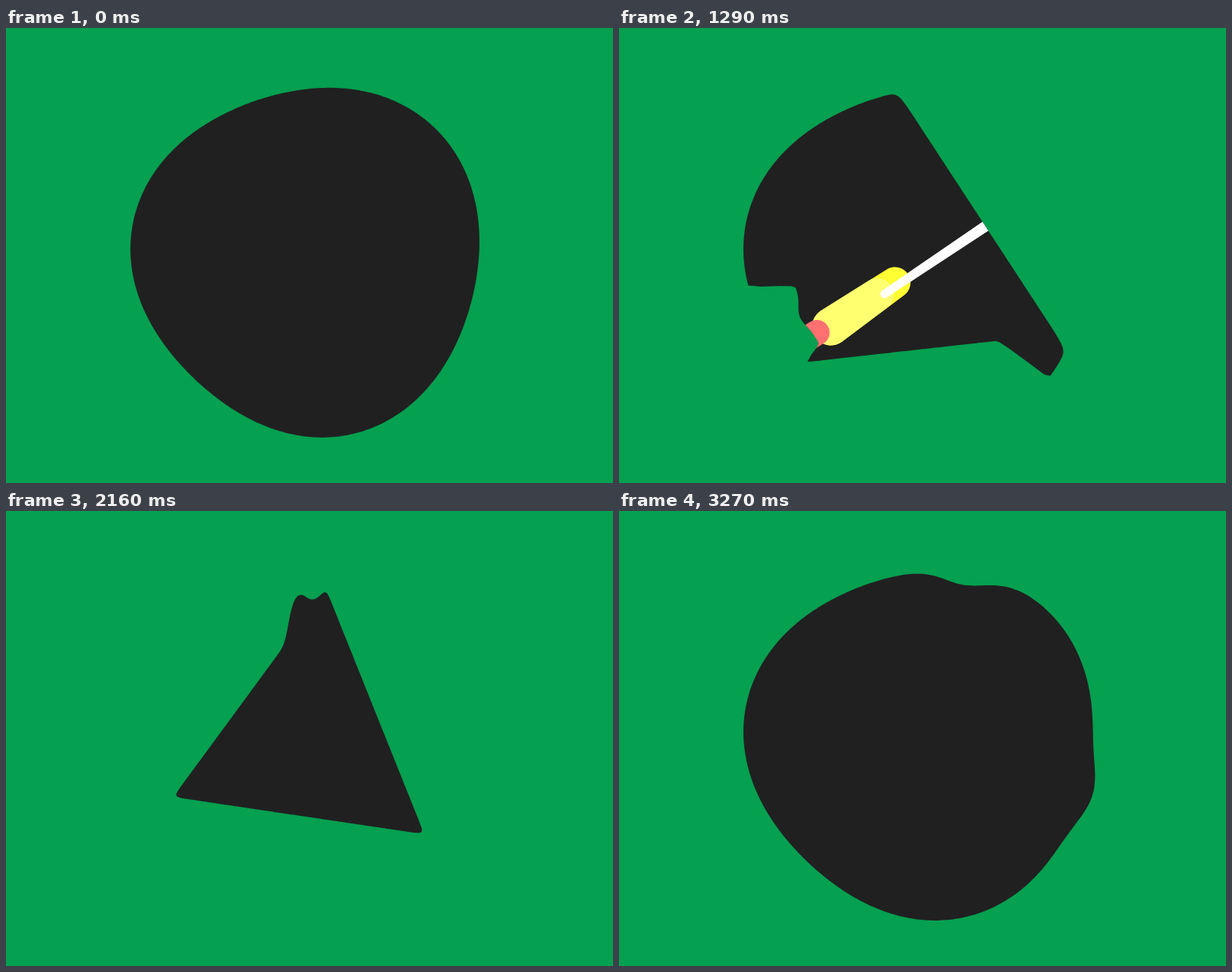
An HTML page with a canvas for the animation above (3.3 s loop, 800 by 600 pixels).

```html
<!DOCTYPE html>
<html lang="en">
<head>
<meta charset="utf-8">
<title>Cut blob</title>
<style>
html, body { margin: 0; width: 100%; height: 100%; overflow: hidden; background: #05a050; }
canvas { display: block; width: 800px; height: 600px; }
</style>
</head>
<body>
<canvas id="stage" width="800" height="600"></canvas>
<script>
const ctx = document.getElementById('stage').getContext('2d');
const LOOP = 3300, STEP = 30, RAD = Math.PI / 180;
const CX = 395, CY = 308;

const cosd = a => Math.cos(a * RAD);
const wrap = a => (a % 360 + 540) % 360 - 180;
const smooth = x => { x = Math.min(1, Math.max(0, x)); return x * x * (3 - 2 * x); };

// Mixes numbers, or whole nested lists and objects of them
function mix(a, b, k) {
  if (typeof a === 'number') return a + (b - a) * k;
  if (Array.isArray(a)) return a.map((v, i) => mix(v, b[i], k));
  return Object.fromEntries(Object.keys(a).map(n => [n, mix(a[n], b[n], k)]));
}
function pose(keys, t) {
  let i = 0;
  while (i < keys.length - 2 && t >= keys[i + 1][0]) i++;
  const [t0, a] = keys[i], [t1, b] = keys[i + 1];
  return mix(a, b, (t - t0) / (t1 - t0));
}

/* Blob: a wavy disc trimmed by three straight cuts.
   cuts: clockwise lines on the right, base and left
   reach: the angles over which each cut already bites
   bumps: angle, height, width; far: how far the cuts have moved outward */
const FULL = [[-130, 80], [0, 180], [120, 320]];
const blobKey = (cuts, bumps, more) =>
  ({ cuts, bumps, reach: FULL, spin: 0, far: 1, tall: 1, ...more });

const firstCuts = [[437,94, 500,290], [412,466, 271,431], [275,440, 200,265]];
const uncut = [[-80, -80], [80, 80], [150, 150]];
const disc = blobKey(firstCuts, [[149, 0, 9], [40, 0, 6]], { reach: uncut });
const rightCut = blobKey(firstCuts, [[149, 0, 9], [40, 24, 6]],
  { reach: [[-130, 33], uncut[1], uncut[2]] });
const baseCut = blobKey([[420,96, 560,446], firstCuts[1], firstCuts[2]],
  [[149, -50, 9], [67, 12, 8]], { reach: [FULL[0], [77, 158], uncut[2]] });
const leftCut = blobKey([[318,87, 580,335], [572,355, 285,444], firstCuts[2]],
  [[152, 33, 4], [248, 28, 8]], { reach: [FULL[0], FULL[1], [120, 199]] });
const topCut = blobKey([[414,85, 550,408], [538,420, 238,385], [234,364, 349,193]],
  [[152, 0, 4], [262, 28, 10]], { reach: [FULL[0], FULL[1], [120, 256]] });
const triangle = blobKey([[447,108, 531,428], [518,440, 228,359], [228,339, 410,146]],
  [[376, 0, 12], [281, 22, 4]]);
const regrown = { ...triangle, spin: 60, far: 2.8, bumps: [[376, 14, 12], [286, -17, 11]] };
const flatBumps = [[376, 0, 12], [286, 0, 11]];

const blobKeys = [
  [0, disc],
  [570, rightCut],
  [1050, baseCut],
  [1560, leftCut],
  [1830, topCut],
  [2190, { ...triangle, spin: -7, bumps: [[376, 0, 12], [274, 40, 5]] }],
  [2550, triangle],
  [2700, { ...triangle, spin: 30, bumps: flatBumps }],
  [3000, { ...regrown, tall: 1.09, bumps: flatBumps }],
  [3270, regrown],
  [3300, { ...regrown, bumps: flatBumps }]
];

function radius(a, s) {
  const SHARP = 30, SOFT = 10;
  const base = 229 - 9 * cosd(3 * (a - 13)) - 7 * cosd(a - 145);
  let sum = base ** -SHARP;
  s.cuts.forEach(([x0, y0, x1, y1], i) => {
    const dx = x1 - x0, dy = y1 - y0, len = Math.hypot(dx, dy);
    const dist = ((x0 - CX) * dy - (y0 - CY) * dx) / len * s.far;
    const normal = Math.atan2(-dx, dy) / RAD + s.spin;
    const [from, to] = s.reach[i];
    const inside = (to - from) / 2 - Math.abs(wrap(a - s.spin - (from + to) / 2));
    const bite = smooth(inside / SOFT + .5) * Math.max(0, cosd(a - normal)) / dist;
    sum += bite ** SHARP;
  });
  const r = sum ** (-1 / SHARP);
  return s.bumps.reduce((v, [at, h, w]) =>
    v + h * Math.exp(-((wrap(a - s.spin * (s.far < 1.5) - at) / w) ** 2)), r);
}

function blobPath(s) {
  const path = new Path2D();
  for (let a = 0; a < 360; a++) {
    const r = radius(a, s);
    path.lineTo(CX + r * cosd(a), CY + r * cosd(a - 90) * s.tall);
  }
  path.closePath();
  return path;
}

/* Tool: capsules along a local axis that points to the handle's end.
   Each capsule is x, y, radius at both ends; pale turns the body white */
const toolKey = (at, body, handle, pink, pale = 0, prong = [0, 0, 0, 0, 0, 0]) =>
  ({ at, body, handle, pink, pale, prong });

const down = toolKey([565, 340, 77], [-90,0,29, -14,0,14], [-10,0,15, 200,0,15],
  [-206,-9,20, -120,-9,20]);
const flat = toolKey([471, 440, 2], [-90,0,29, -14,0,14], [-46,14,6, 169,10,10],
  [-206,-10,20, -120,-9,20]);
const up = toolKey([279, 194, -75], [-160,1,20, -28,0,28], [-34,-6,5, 95,1,4],
  [-215,0,13, -168,3,13]);
const away = toolKey([416, 55, -53.5], [-112,-4,9, -19,-4,14], [-10,0,4, 53,-3,11],
  [-118,-4,3, -104,-6,3], 1, [-55,-25,4, -17,-18,4]);
const gone = { ...away, at: [520, -130, -53.5] };

const toolKeys = [
  [0, { ...down, at: [850, 320, 110] }],
  [570, down], [1050, flat], [1560, up], [1830, away], [2040, gone], [LOOP, gone]
];

function capsule([x0, y0, r0, x1, y1, r1], ink) {
  const dx = x1 - x0, dy = y1 - y0, d = Math.hypot(dx, dy) || 1;
  const base = Math.atan2(dy, dx);
  const off = Math.acos(Math.max(-1, Math.min(1, (r0 - r1) / d)));
  ctx.beginPath();
  ctx.arc(x1, y1, r1, base - off, base + off);
  ctx.arc(x0, y0, r0, base + off, base - off + 2 * Math.PI);
  ctx.fillStyle = ink;
  ctx.fill();
}

function drawTool(tool) {
  const yellow = blue => `rgb(255, 255, ${mix(blue, 255, tool.pale)})`;
  const [x0, y0, r0, x1, y1, r1] = tool.body;
  ctx.translate(tool.at[0], tool.at[1]);
  ctx.rotate(tool.at[2] * RAD);
  capsule(tool.body, yellow(51));
  capsule([x0, y0, r0, x1 - 28, y1, mix(r1, r0, .25)], yellow(112));
  capsule(tool.handle, '#fff');
  capsule(tool.prong, '#fff');
  capsule(tool.pink, '#ff7070');
}

function draw(t) {
  ctx.fillStyle = '#05a050';
  ctx.fillRect(0, 0, 800, 600);
  const blob = blobPath(pose(blobKeys, t));
  ctx.fillStyle = '#202020';
  ctx.fill(blob);
  ctx.save();
  if (t < 1700) ctx.clip(blob);
  drawTool(pose(toolKeys, t));
  ctx.restore();
}

const start = performance.now();
function tick() {
  const t = (performance.now() - start) % LOOP;
  draw(Math.floor(t / STEP) * STEP);
  requestAnimationFrame(tick);
}
tick();
</script>
</body>
</html>
```
